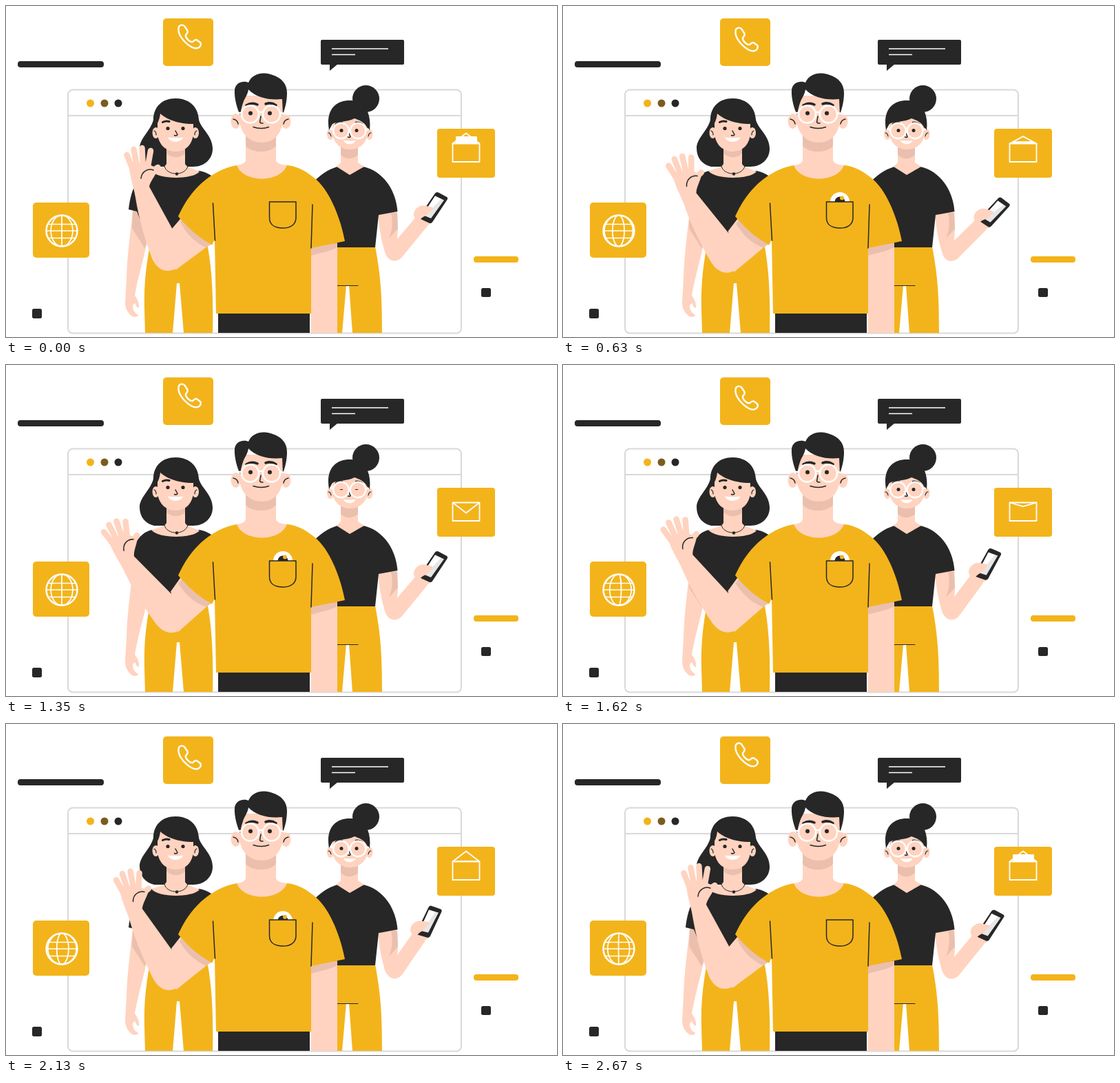
Write an HTML page that moves like this. It is 800x480 px and loops after 2700 ms.

```html
<!DOCTYPE html>
<html lang="en">
<head>
<meta charset="utf-8">
<title>Team greeting</title>
<style>
  html, body { margin: 0; width: 100%; height: 100%; overflow: hidden; background: #fff; }
  svg { display: block; width: 800px; height: 480px; }
  .y { fill: #f3b41b; }
  .k { fill: #272727; }
  .s { fill: #ffd3bf; }
  .d { fill: #ebbfad; }
  .w { fill: #fff; }
  .line { fill: none; stroke: #272727; stroke-width: 1.5; stroke-linecap: round; stroke-linejoin: round; }
  .brow { stroke-width: 3; }
  .white { fill: none; stroke: #fff; stroke-width: 2; stroke-linejoin: round; }
  .finger { fill: none; stroke: #ffd3bf; stroke-width: 8.5; stroke-linecap: round; }
  .frame { fill: none; stroke: #d9d9d9; stroke-width: 2; }
</style>
</head>
<body>
<svg viewBox="0 0 800 480">
  <clipPath id="abovePocket"><rect x="380" y="260" width="44" height="24"/></clipPath>
  <clipPath id="aboveEnvelope"><rect x="640" y="180" width="60" height="19"/></clipPath>

  <!-- window -->
  <rect class="frame" x="90" y="121.500" width="571" height="353" rx="7"/>
  <path class="frame" d="M90 159H661"/>
  <circle class="y" cx="122.500" cy="141" r="5.500"/>
  <circle cx="143" cy="141" r="5.500" fill="#7a5c20"/>
  <circle class="k" cx="163" cy="141" r="5.500"/>

  <!-- loose decorations -->
  <rect class="k" x="17" y="80" width="125" height="9" rx="4"/>
  <rect class="y" x="679" y="363" width="65" height="9" rx="4"/>
  <rect class="k" x="38" y="439" width="14" height="14" rx="2.500"/>
  <rect class="k" x="690" y="409" width="14" height="13" rx="2.500"/>
  <rect class="k" x="457" y="49" width="121" height="36" rx="2"/>
  <path class="k" d="M470 84V94L482 84Z"/>
  <path class="white" style="stroke-width:1.5" d="M473 62H555M473 70.500H507"/>

  <!-- tiles -->
  <rect class="y" x="228" y="18" width="73" height="69" rx="5"/>
  <path id="handset" class="white" style="stroke-width:2.4" d="M251 34C253 31 257 31 259 33L263 39C265 42 263 44 261 46C260 50 267 57 271 56C273 54 276 52 278 54L282 57C284 60 282 64 278 65C268 68 247 47 251 34Z"/>
  <rect class="y" x="39" y="285" width="82" height="80" rx="5"/>
  <circle class="white" cx="81" cy="326" r="22.500" style="stroke-width:2.4"/>
  <path class="white" style="stroke-width:1.7" d="M61 316.500H101M58 326H104M61 336.500H101"/>
  <path id="meridians" class="white" style="stroke-width:1.7"/>
  <rect class="y" x="626" y="178" width="84" height="71" rx="4"/>
  <g clip-path="url(#aboveEnvelope)"><rect id="letter" class="w" x="653" y="199" width="31" height="24" rx="1"/></g>
  <rect class="white" x="648.500" y="199.500" width="39" height="26.500" style="stroke-width:1.8"/>
  <path id="flap" class="white" style="stroke-width:1.8"/>

  <!-- woman on the left -->
  <path class="k" d="M214 165C214 146 227 134 246 134C266 134 279 146 280 165C283 178 300 188 300 207C300 222 288 233 272 233H215C202 230 194 220 194 206C194 192 210 181 214 165Z"/>
  <path class="s" d="M184 297C180 335 176 360 175 395L173 430C173 440 179 449 186 451C190 451 192 450 192 448C186 445 184 440 184 434L187 431C189 433 189 437 192 438C195 436 192 426 187 420C191 395 199 370 204 346L200 297Z"/>
  <path class="d" d="M184 297L202 300L204 346L201 351C195 340 187 330 183 322Z"/>
  <path class="y" d="M210 340C204 375 200 400 201 440L202 474H242L248 402H252L258 474H300C301 430 300 380 291 340Z"/>
  <path class="k" d="M212 239C190 244 181 268 178 295L190 298L208 342H296L302 300V250C296 243 289 241 281 239Z"/>
  <path class="s" d="M233 195V229C230 235 220 236 211 239C220 252 272 252 281 240C273 236 263 235 260 229V195Z"/>
  <path class="d" d="M233 203H260V214C252 221 242 221 233 214Z"/>
  <path class="line" style="stroke-width:1" d="M230 232C233 247 261 247 264 232"/>
  <circle class="k" cx="248" cy="243.500" r="2.200"/>
  <ellipse class="s" cx="217.500" cy="184" rx="5" ry="8"/>
  <ellipse class="s" cx="275" cy="184" rx="5" ry="8"/>
  <path class="line" style="stroke-width:1.2" d="M215 181Q218 182 218 187M277 181Q274 182 274 187"/>
  <path class="s" d="M220 155V186C222 203 234 211 246 211C259 211 270 203 272 186V155Z"/>
  <path class="k" d="M215 177C212 150 226 136 246 136C267 136 280 152 277 177L272 171C255 171 236 167 224 156C223 165 220 171 215 177Z"/>
  <path class="line brow" d="M227.500 168.500Q232 166 237 167.500M256 167.500Q261 166 266 169"/>
  <path class="line" d="M246 181L249 186.500Q247 189 244.500 187.500"/>
  <path class="w" d="M235 190.500Q246 192 257 190.500C255 199 238 199 235 190.500Z"/>
  <g id="eyesLeft"><circle class="k" cx="235" cy="177.500" r="2.600"/><circle class="k" cx="257" cy="177.500" r="2.600"/></g>

  <!-- woman on the right -->
  <circle class="k" cx="522.500" cy="134.500" r="19.500"/>
  <path class="y" d="M470 349H536C544 390 546 420 546 474H503L498 405H494L488 474H470Z"/>
  <path class="line" style="stroke-width:1.2" d="M480 405.500H511"/>
  <path class="s" d="M540 300C542 325 545 340 550 356C554 364 560 367 566 363L569 325L568 297Z"/>
  <g id="phoneArm">
    <path class="s" d="M549 352C552 371 566 374 575 364L612 319L596 305L568 338Z"/>
    <path class="s" d="M592 304C591 295 600 288 608 290L618 296L617 315C610 321 602 320 597 315Z"/>
    <g id="phone">
      <path class="k" d="M623 271.500Q625 269 628 270.500L640 277Q642 278.500 640.500 281L619 313.500Q617 316 614 314.500L601 308.500Q599 307 600.500 304.500Z"/>
      <path fill="#e6e6e6" d="M623 275.500L636 281.500L617 308L605 303Z"/>
      <path class="w" d="M623 275.500L632 280L610 302L605 303Z"/>
    </g>
    <path class="s" d="M593 300C596 290 605 288 610 290L619 292Q621 295 617 297L611 303L604 307L597 314Z"/>
  </g>
  <path class="d" d="M559 300H568L569 323L556 337C561 325 562 312 559 300Z"/>
  <path class="k" d="M481 233C465 238 455 246 444 258V350H536L541 303L568.500 298C566 265 546 239 519 233Z"/>
  <path class="s" d="M486 200V227L480 233L499 245L520 233L511 227V200Z"/>
  <path class="d" d="M486 204H511V216C503 223 494 223 486 216Z"/>
  <ellipse class="s" cx="471" cy="186" rx="5" ry="8"/>
  <ellipse class="s" cx="527.500" cy="186" rx="5" ry="8"/>
  <path class="line" style="stroke-width:1.2" d="M468 184Q471 184 472 189M530 184Q527 184 526 189"/>
  <path class="s" d="M474 160V186C476 200 487 208 499 208C512 208 523 200 525 186V160Z"/>
  <path class="k" d="M469 180C464 151 478 137 499 137C519 137 531 152 528 180L524 176C522 170 515 166 506 163C494 169 480 167 474 171Z"/>
  <path class="line brow" style="stroke-width:2.5" d="M479 171Q483 168 488 169M508 169Q513 168 517 171"/>
  <path class="line" d="M498 184L500 189.500Q499 191 496.500 190"/>
  <path class="w" d="M490 195Q499 196 507.500 195C505 202 493 202 490 195Z"/>
  <g id="eyesRight"><circle class="k" cx="487" cy="180.500" r="2.500"/><circle class="k" cx="509" cy="180.500" r="2.500"/></g>
  <g class="white" style="stroke-width:2.4"><circle cx="486.500" cy="181" r="11.300"/><circle cx="511" cy="181" r="11.300"/><path d="M470 179H475M522 179H527"/></g>

  <!-- man -->
  <path class="s" d="M443 345H481V474H443Z"/>
  <path class="d" d="M443 350L481 343V350C470 356 456 358 443 362Z"/>
  <g id="upperArm">
    <path class="s" d="M241 323L258 303L302 340L296 346L246 383Z"/>
    <path class="d" d="M253 313L259 306L301 344L290 350C274 343 261 329 253 313Z"/>
  </g>
  <g id="forearm">
    <path class="s" d="M179 234C181 254 186 264 188 278C193 309 202 339 212 366C220 384 235 389 250 379L275 356L248 335L208 262C209 255 216 247 219 240L212 232L205 226L185 228Z"/>
    <path class="finger" d="M186 242L175.500 216M191 236L185.500 208M199 236L197.500 206M205 238L210 210M208 248Q213 238 220.500 234"/>
    <path class="line" d="M196 250C197 240 206 235 214 238"/>
  </g>
  <path class="k" d="M308 444H441V474H308Z"/>
  <path class="y" d="M335 231C298 238 268 265 250 305Q272 332 299 346.500L303 339L305 446H443V351L492 341C485 304 468 264 446 248C432 237 420 232 408 231Z"/>
  <path class="line" d="M300.500 286L303.500 340M445 288L443 351"/>
  <path class="s" d="M348 190V224C346 229 341 230 335 231C345 257 398 257 408 231C400 230 394 229 392 224V190Z"/>
  <path class="d" d="M348 188H392V203C382 214 358 214 348 203Z"/>
  <g clip-path="url(#abovePocket)"><g id="peeker">
    <circle class="w" cx="402" cy="284" r="14"/><circle class="k" cx="402" cy="284" r="7.500"/><circle class="y" cx="405" cy="278.500" r="3"/>
  </g></g>
  <path class="line" d="M382.500 284H421V307C421 317 413 322 402 322C390 322 382.500 317 382.500 307Z"/>
  <ellipse class="s" cx="333.500" cy="167" rx="7" ry="11"/>
  <ellipse class="s" cx="406.500" cy="167" rx="7" ry="11"/>
  <path class="line" d="M330 164Q336 165 337 171M410 164Q404 165 403 171"/>
  <path class="s" d="M339 130V166C341 187 355 198 371 198C388 198 400 187 402 166V130Z"/>
  <path class="k" d="M340 158C336 150 331 134 332 121C334 110 345 108 352 111C358 97 375 95 387 100C400 104 408 113 408 126C408 139 405 148 402 158L401 135C383 137 363 133 352 121C351 129 346 134 344 141C342 146 341 152 340 158Z"/>
  <path class="line brow" style="stroke-width:3.500" d="M349 144Q357 139 365 143M377 142Q385 139 392 144"/>
  <path class="line" d="M370 160L368.500 168.500Q370 170.500 373 170"/>
  <path class="line" d="M359 175.500Q371 179.500 381.500 175.500"/>
  <g id="eyesMan"><circle class="k" cx="355" cy="155.500" r="3"/><circle class="k" cx="383" cy="155.500" r="3"/></g>
  <g class="white" style="stroke-width:2.5"><circle cx="354.500" cy="157" r="12.500"/><circle cx="385.500" cy="157" r="12.500"/><path d="M367 154H373M337 155H342M398 155L411 157"/></g>
</svg>
<script>
const LOOP = 2700;
const $ = id => document.getElementById(id);
const move = (id, transform) => $(id).setAttribute('transform', transform);

// Smooth periodic curve through [time, value] keys, without overshoot.
function curve(keys) {
  const n = keys.length;
  const key = i => {
    const k = keys[(i + n) % n];
    return [k[0] + LOOP * Math.floor(i / n), k[1]];
  };
  const slope = i => {
    const [t0, a] = key(i - 1), [, b] = key(i), [t2, c] = key(i + 1);
    return (b - a) * (c - b) <= 0 ? 0 : (c - a) / (t2 - t0);
  };
  return t => {
    let i = n - 1;
    while (keys[i][0] > t) i--;
    const [t0, a] = key(i), [t1, b] = key(i + 1);
    const h = t1 - t0, u = (t - t0) / h, v = 1 - u;
    return v * v * (a * (1 + 2 * u) + h * u * slope(i)) +
           u * u * (b * (1 + 2 * v) - h * v * slope(i + 1));
  };
}

const wave = curve([[0, 0], [360, .34], [930, .92], [1350, 1], [1890, .66], [2370, .21]]);
const flapY = curve([[0, -15], [360, -15], [930, 0], [1250, 15], [1400, 15], [1890, -12], [2200, -15]]);
const letterRise = curve([[0, 10], [400, 10], [750, 0], [2050, 0], [2370, 6], [2600, 10]]);
const peekDrop = curve([[0, 17], [180, 16], [360, 11], [640, 0], [2050, 0], [2370, 12], [2520, 17]]);

function blink(id, y, t, ...times) {
  const open = Math.min(1, ...times.map(at => Math.max(.25, Math.abs(t - at) / 130)));
  move(id, `translate(0 ${y * (1 - open)}) scale(1 ${open})`);
}

// Meridians stand 45 degrees apart and drift to the right.
function globe(turn) {
  let d = '';
  for (let angle = -90 + 45 * (turn % 1); angle < 90; angle += 45) {
    const rx = 22.5 * Math.sin(angle * Math.PI / 180);
    d += `M81 303.5A${Math.abs(rx)} 22.5 0 0 ${rx > 0 ? 1 : 0} 81 348.5`;
  }
  $('meridians').setAttribute('d', d);
}

function draw(t) {
  const phase = 2 * Math.PI * t / LOOP;
  move('upperArm', `rotate(${-5 * wave(t)} 300 345)`);
  move('forearm', `rotate(${-16 * wave(t)} 252 348)`);
  move('phoneArm', `rotate(${5.3 * Math.sin(phase)} 560 354)`);
  move('phone', `rotate(${3.5 * Math.sin(phase)} 610 300)`);
  move('handset', `translate(0 ${-4 * Math.cos(phase) ** 8})`);
  move('letter', `translate(0 ${-letterRise(t)})`);
  move('peeker', `translate(0 ${peekDrop(t)})`);
  $('flap').setAttribute('d', `M648.5 199.5L668 ${199.5 + flapY(t)}L687.5 199.5`);
  globe(2 * t / LOOP);
  blink('eyesLeft', 177.5, t, 930, 2370);
  blink('eyesRight', 180.5, t, 1350);
  blink('eyesMan', 155.5, t, 360);
}

function tick() {
  draw(performance.now() % LOOP);
  requestAnimationFrame(tick);
}
tick();
</script>
</body>
</html>
```
